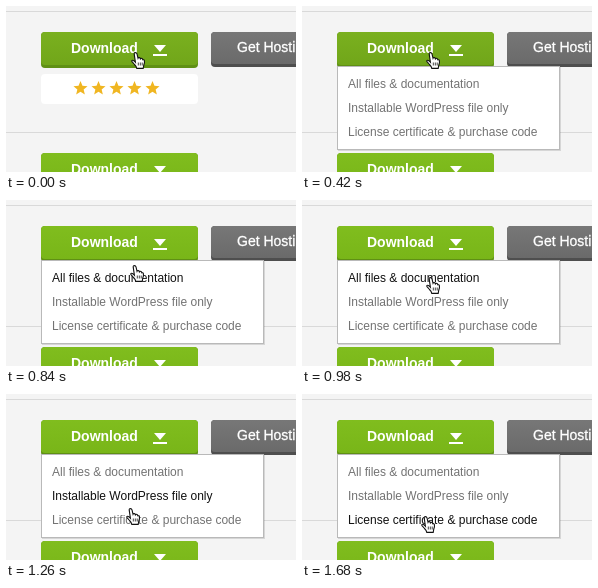
An HTML page with a canvas for the animation above (1820 ms loop, 290x166 px).

```html
<!DOCTYPE html>
<html lang="en">
<head>
<meta charset="utf-8">
<title>Download menu</title>
<style>
html, body { margin: 0; height: 100%; overflow: hidden; background: #f4f4f4; }
canvas { display: block; }
</style>
</head>
<body>
<canvas id="stage" width="290" height="166"></canvas>
<script>
const ctx = document.getElementById('stage').getContext('2d');
const LOOP = 1820, STEP = 70;
const FONT = '"Liberation Sans", Arial, sans-serif';
const ITEMS = [
  'All files & documentation',
  'Installable WordPress file only',
  'License certificate & purchase code'
];
// Pointer path: time, x, y
const POINTER = [
  [0, 125, 46], [70, 124, 46], [630, 124, 46], [700, 124, 53],
  [980, 124, 77], [1260, 120, 114], [1680, 119, 122], [LOOP, 119, 122]
];
const HAND = new Path2D('M4.4 10.2L3.2 2.2Q3 .6 4.4 .6Q5.7 .6 6 2L7 6.2Q7.3 5.4 8.3 5.6' +
  'Q9.3 5.8 9.4 6.8Q10 6 11 6.5Q11.8 7 11.8 7.8Q13 7.4 13.4 8.6Q13.8 10.5 12.8 13' +
  'L12.2 16.4H5.8Q5.5 14.5 3.5 12.5L1 9.6Q.3 8.3 1.6 8.2Q2.6 8.2 4.4 10.2Z');
const CREASES = new Path2D('M7.3 10.5v3M9.3 10.5v3M11.2 10.5v3');

function rect(x, y, w, h, fill, radius = 0) {
  ctx.fillStyle = fill;
  ctx.beginPath();
  ctx.roundRect(x, y, w, h, radius);
  ctx.fill();
}

function poly(points, fill) {
  ctx.fillStyle = fill;
  ctx.beginPath();
  points.forEach(p => ctx.lineTo(...p));
  ctx.closePath();
  ctx.fill();
}

function text(str, x, y, font, fill) {
  ctx.font = `${font} ${FONT}`;
  ctx.fillStyle = fill;
  ctx.fillText(str, x, y);
}

function button(x, y, w, bottom, top, base, edge) {
  const face = ctx.createLinearGradient(0, y, 0, bottom);
  face.addColorStop(0, top);
  face.addColorStop(1, base);
  rect(x, y, w, bottom - y, edge, 4);
  rect(x, y, w, bottom - y - 3, face, 4);
}

function download(y, bottom, hover) {
  button(35, y, 157, bottom, hover ? '#7ab01f' : '#80bd1e', hover ? '#70a519' : '#78b518', '#5f9014');
  text('Download', 65, y + 21, 'bold 14px', '#fff');
  poly([[148, y + 13], [160, y + 13], [154, y + 20]], '#fff');
  rect(147, y + 22, 14, 2, '#fff');
}

function star(cx, cy) {
  const points = Array.from({ length: 10 }, (_, i) => {
    const r = i % 2 ? 3.3 : 7.4, a = i * Math.PI / 5 - Math.PI / 2;
    return [cx + r * Math.cos(a), cy + r * Math.sin(a)];
  });
  poly(points, '#f0b622');
}

function menu(active) {
  rect(36, 61, 223, 84, 'rgba(0,0,0,.12)');
  rect(35, 60, 223, 84, '#b9b9b9');
  rect(36, 61, 221, 82, '#fff');
  ITEMS.forEach((item, i) =>
    text(item, 46, 82 + 24 * i, '12px', i === active ? '#111' : '#737373'));
}

function pointerAt(t) {
  const i = POINTER.findIndex(p => p[0] > t);
  const [t0, x0, y0] = POINTER[i - 1], [t1, x1, y1] = POINTER[i];
  const k = (t - t0) / (t1 - t0);
  return [Math.round(x0 + (x1 - x0) * k), Math.round(y0 + (y1 - y0) * k)];
}

function pointer(x, y) {
  ctx.save();
  ctx.translate(x, y);
  ctx.fillStyle = '#fff';
  ctx.strokeStyle = '#111';
  ctx.lineWidth = 1.1;
  ctx.fill(HAND);
  ctx.stroke(HAND);
  ctx.lineWidth = .8;
  ctx.stroke(CREASES);
  ctx.restore();
}

function draw(t) {
  const [x, y] = pointerAt(t);
  const pressed = t >= 210 && t < 420, open = t >= 420;

  rect(0, 0, 290, 166, '#f4f4f4');
  rect(0, 5, 290, 1, '#d9d9d9');
  rect(0, 126, 290, 1, '#d9d9d9');

  download(pressed ? 27 : 26, 62, y < 60);
  download(147, 183, false);
  button(205, 26, 110, 61, '#777', '#696969', '#4e4e4e');
  text('Get Hosting', 231, 46, '14px', '#fff');
  ctx.strokeStyle = '#fff';
  ctx.lineWidth = .3;
  ctx.strokeText('Get Hosting', 231, 46);

  rect(35, 68, 157, 30, '#fff', 4);
  for (let i = 0; i < 5; i++) star(74.5 + 18 * i, 82.5);

  if (open) menu(y < 64 ? -1 : y < 90 ? 0 : y < 117 ? 1 : 2);
  pointer(x, y);
}

function tick(now) {
  draw(Math.floor(now % LOOP / STEP) * STEP);
  requestAnimationFrame(tick);
}
tick(performance.now());
</script>
</body>
</html>
```
